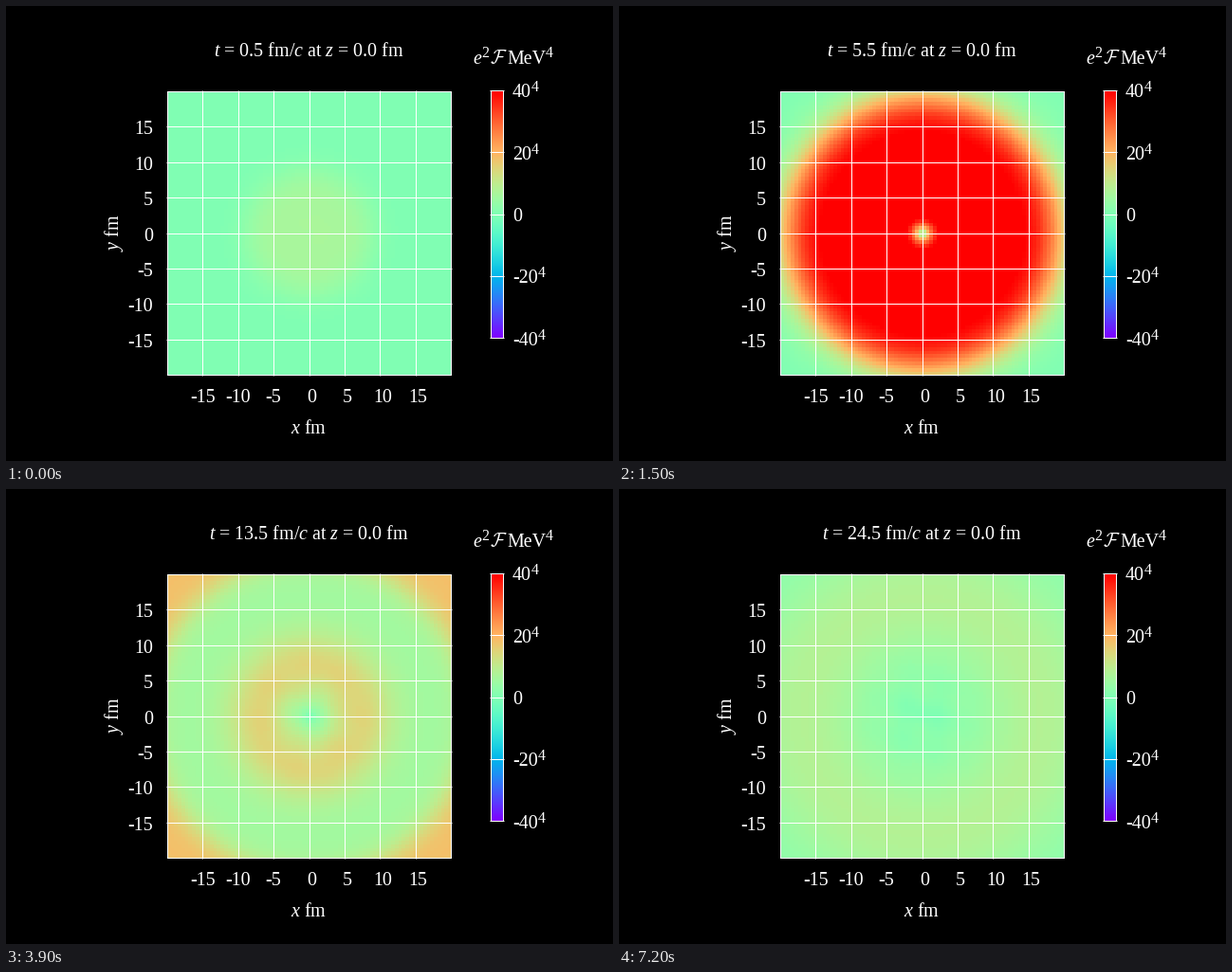
These frames come from a looping animation (640x480 px, 7350 ms). A matplotlib script:

```python
import numpy as np
import matplotlib.pyplot as plt
from matplotlib.animation import FuncAnimation
from matplotlib.patches import Rectangle

W, H, DPI = 640, 480, 100
FRAMES, INTERVAL = 49, 150
PX = 72 / DPI
EM = 20
LEFT, RIGHT, TOP, BOTTOM = 170, 469, 90, 389

plt.rcParams.update({
    "font.family": "Liberation Serif",
    "mathtext.fontset": "custom",
    "mathtext.rm": "Liberation Serif",
    "mathtext.it": "Liberation Serif:italic",
    "axes.unicode_minus": False,
    "toolbar": "None",
})

cells = np.linspace(-19.75, 19.75, 80)
X, Y = np.meshgrid(cells, -cells)
R = np.hypot(X, Y)


def step(r, edge, width):
    """Smooth rise from 0 to 1 around r = edge."""
    return 1 / (1 + np.exp((edge - r) / width))


def field(t):
    """Field strength on the grid, scaled to the colour range -1..1."""
    rise = .33 * t
    # Fast outer shell, a wake that decays sooner, a slow second ring
    shell = min(rise, .65 * (9.5 / t) ** .9)
    wake = .3 * (9.5 / t) ** 2.38
    ring = 5 * np.exp(.08 * (t - 9.5))
    bump = np.exp(-.5 * ((R - ring) / (1.5 + .3 * ring)) ** 2)
    bump *= .25 * np.exp(-((t - 13.5) / 18) ** 2)
    inner = np.minimum(rise, wake + bump)

    v = inner + (shell - inner) * step(R, 16 + 1.55 * (t - 9.5), 1.2)
    v *= 1 - step(R, 7.5 + 2.1 * t, 1.2 + .1 * t)
    v *= 1 - np.exp(-R / min(.27 * t, 1.8))
    swirl = np.sin(.8 * X + .5 * Y - .4 * t) * np.cos(.6 * Y - .4 * X + .3 * t)
    return v + .003 * min(t, 10) * np.exp(-(R / 7) ** 2) * swirl


fig = plt.figure(figsize=(W / DPI, H / DPI), dpi=DPI, facecolor="black")
ax = fig.add_axes([0, 0, 1, 1])
ax.axis("off")


def text(x, y, s, size=EM, **kw):
    kw = {"ha": "left", "va": "baseline", "color": "white", **kw}
    return ax.text(x, y, s, fontsize=size * PX, **kw)


def rect(x0, y0, x1, y1):
    """One-pixel outline through the given pixel columns and rows."""
    ax.add_patch(Rectangle((x0 + .5, y0 + .5), x1 - x0, y1 - y0, fill=False,
                           ec="white", lw=PX, snap=False, zorder=3))


def hline(x0, x1, y):
    ax.plot([x0, x1 + 1], [y + .5] * 2, "w", lw=PX, snap=False, zorder=3)


def vline(x, y0, y1):
    ax.plot([x + .5] * 2, [y0, y1 + 1], "w", lw=PX, snap=False, zorder=3)


style = dict(cmap="rainbow", vmin=-1, vmax=1, aspect="auto",
             interpolation="nearest")
heat = ax.imshow(field(.5), extent=(LEFT, RIGHT + 1, BOTTOM + 1, TOP), **style)
ax.imshow(np.linspace(1, -1, 261)[:, None], extent=(511, 525, 351, 89), **style)
ax.set_xlim(0, W)
ax.set_ylim(H, 0)

# Grid and tick labels
for v in range(-15, 16, 5):
    px = LEFT + (v + 20) / 40 * (RIGHT - LEFT)
    py = BOTTOM - (v + 20) / 40 * (BOTTOM - TOP)
    vline(round(px), TOP, BOTTOM)
    hline(LEFT, RIGHT, round(py))
    text(px + (2.5 if v >= 0 else 0), 418, str(v), ha="center")
    text(155, py + 8, str(v), ha="right")
rect(LEFT, TOP, RIGHT, BOTTOM)

# Colour bar
rect(511, 89, 524, 350)
for k, label in enumerate(["40", "20", "0", "-20", "-40"]):
    y = 89 + 65.25 * k
    hline(511, 524, round(y))
    text(534, y + 7.5, label)
    if label != "0":
        width = EM * (1 + .333 * label.startswith("-"))
        text(534 + width, y + 1.5, "4", 16)

text(492, 61, "e", style="italic")
text(501, 54, "2", 16)
text(510, 61, r"$\mathcal{F}$", math_fontfamily="cm")
text(528, 61, "MeV")
text(569, 54, "4", 16)

# Titles
title = text(319.5, 53, "", ha="center")
text(319, 451, "$x$ fm", ha="center")
text(125.5, 239.5, "$y$ fm", ha="right", va="center", rotation=90)


def update(i):
    t = .5 + .5 * i
    heat.set_data(field(t))
    title.set_text(f"$t$ = {t:.1f} fm/$c$ at $z$ = 0.0 fm")
    return heat, title


anim = FuncAnimation(fig, update, frames=FRAMES, interval=INTERVAL,
                     repeat=True, repeat_delay=0)
plt.show()
```
